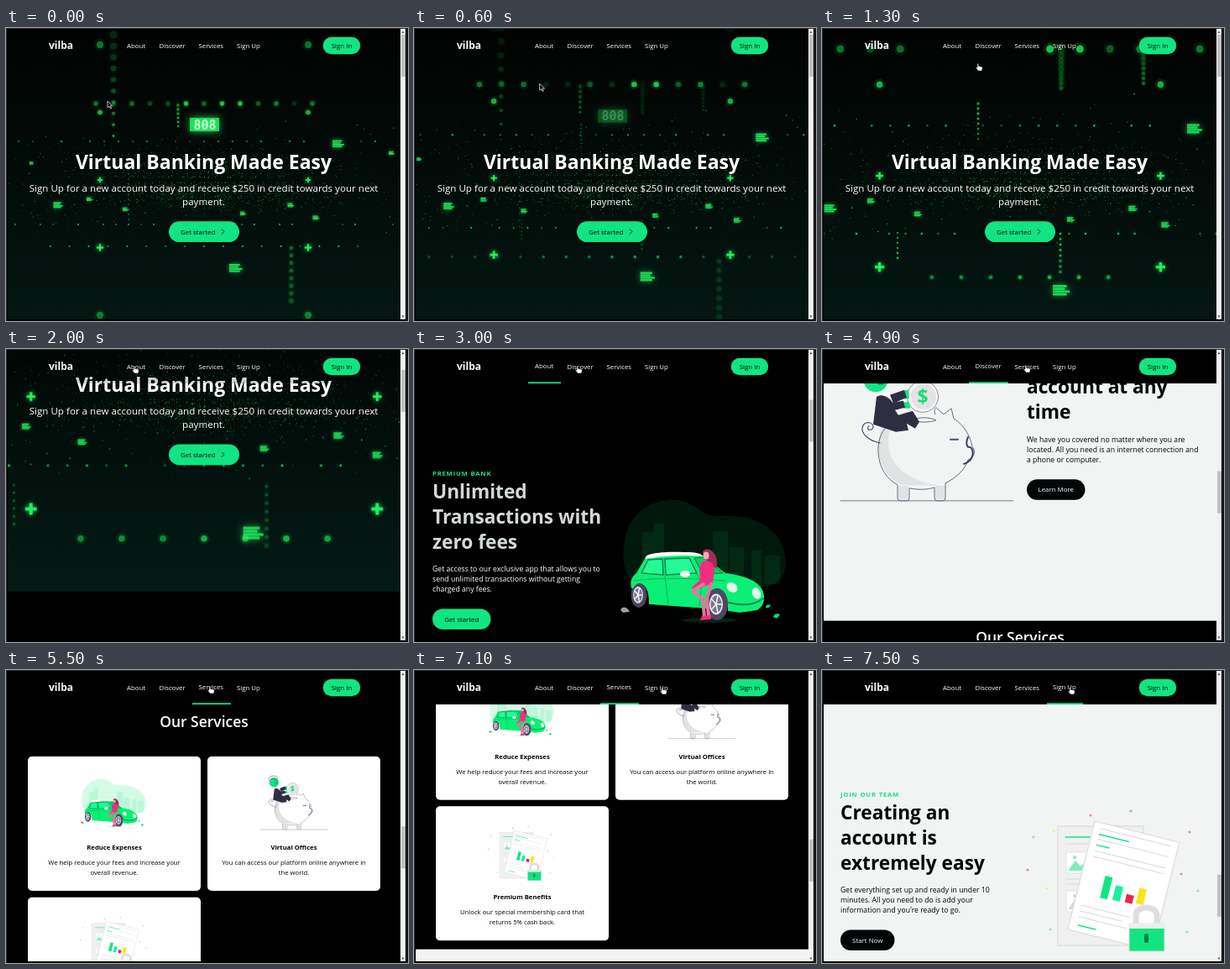
Write an HTML page with a canvas that moves like this. It is 479 by 349 pixels and loops after 8000 ms.

```html
<!DOCTYPE html>
<html lang="en">
<head>
<meta charset="utf-8">
<title>Banking landing page</title>
<style>
html, body { margin: 0; width: 100%; height: 100%; overflow: hidden; background: #000; }
#stage { position: relative; width: 479px; height: 349px; overflow: hidden; background: #000; }
#view { position: absolute; left: 2px; top: 1px; width: 468px; height: 346px; overflow: hidden; }
#page { position: absolute; left: -2px; top: -1px; width: 479px; height: 2311px; }
#page > *, #chrome { position: absolute; left: 0; top: 0; }
svg { display: block; }
text { font-family: "Open Sans", "Noto Sans", sans-serif; white-space: pre; }
</style>
</head>
<body>
<div id="stage">
  <div id="view"><div id="page">
    <canvas id="hero" width="479" height="406"></canvas>
    <svg id="content" width="479" height="2311"></svg>
  </div></div>
  <svg id="chrome" width="479" height="349"></svg>
</div>
<script>
const LOOP = 8000, STEP = 100;
const GREEN = '#10e582', INK = '#010606', LIGHT = '#f2f4f4', NAVY = '#2f2e41';
const $ = id => document.getElementById(id);
const clamp = (v, a = 0, b = 1) => Math.min(b, Math.max(a, v));

// ---- markup helpers ----
const text = (x, y, size, str, fill = '#fff', extra = '') =>
  `<text x="${x}" y="${y}" font-size="${size}" fill="${fill}" ${extra}>${str}</text>`;
const lines = (x, y, gap, size, list, fill, extra) =>
  list.map((s, i) => text(x, y + i * gap, size, s, fill, extra)).join('');
const rect = (x, y, w, h, fill, r = 0, extra = '') =>
  `<rect x="${x}" y="${y}" width="${w}" height="${h}" rx="${r}" fill="${fill}" ${extra}/>`;
const oval = (x, y, rx, ry, fill, extra = '') =>
  `<ellipse cx="${x}" cy="${y}" rx="${rx}" ry="${ry}" fill="${fill}" ${extra}/>`;
const path = (d, fill, extra = '') => `<path d="${d}" fill="${fill}" ${extra}/>`;
const line = (d, color, w = 1) =>
  `<path d="${d}" fill="none" stroke="${color}" stroke-width="${w}" stroke-linecap="round" stroke-linejoin="round"/>`;
const group = (transform, body) => `<g transform="${transform}">${body}</g>`;
const BOLD = 'font-weight="700"', MID = 'text-anchor="middle"';
const pill = (x, y, w, h, label, fill, ink) =>
  rect(x, y, w, h, fill, h / 2) + text(x + w / 2, y + h / 2 + 2.8, 7.9, label, ink, MID);

// ---- illustrations ----
function wheel(x, y, rx, ry) {
  let spokes = '';
  for (let i = 0; i < 5; i++) {
    const a = i * Math.PI * 2 / 5;
    spokes += `M${x - 1} ${y}l${rx * .5 * Math.cos(a)} ${ry * .54 * Math.sin(a)}`;
  }
  return oval(x, y, rx, ry, '#4a4860') + oval(x - 1, y, rx * .62, ry * .66, '#e6e6ea') +
    oval(x - 1, y, rx * .5, ry * .54, '#77758a') + line(spokes, '#f0f0f4', 1.6);
}

const car = haze =>
  path('M252 264C243 225 258 184 303 180C335 178 340 200 362 199C405 195 440 215 443 250C444 275 430 285 405 284L262 284Z', '#10e572', `opacity="${haze}"`) +
  `<g opacity="${haze * .7}">${[[272, 218, 14], [286, 208, 12], [356, 217, 18], [376, 236, 17], [402, 240, 12], [418, 246, 18]]
    .map(([x, y, w]) => rect(x, y, w, 280 - y, '#10e572')).join('')}</g>` +
  oval(352, 323, 32, 3, '#10e572', 'opacity=".16"') +
  wheel(268, 293, 9.5, 15) +
  path('M259 285C257 276 260 271 265 267L276 248C300 243 330 242 344 246L371 267C395 270 412 277 416 289C419 299 416 307 409 311L388 314L374 312C376 283 350 279 348 309L280 304C281 281 268 272 261 285Z', '#0bef76') +
  path('M271 267L279 251L296 250L297 269ZM300 269L299 250L328 249L337 267Z', '#20fb96', 'stroke="#0a7f48" stroke-width="1.4"') +
  path('M334 249L344 248L368 267L344 268Z', '#12c869', 'stroke="#0a7f48"') +
  path('M276 248C277 243 300 241 322 242C338 242 343 244 344 247C320 245 300 246 276 250Z', '#fff') +
  line('M262 276C290 272 330 273 371 276M299 270L303 304M337 268L343 279L340 307', '#08a957', .9) +
  line('M375 302C390 306 405 306 416 297', '#078b48', 2) +
  oval(323, 268, 6, 4, '#f1f1f1') + oval(379, 284, 7, 5.5, '#e4f7ec', 'transform="rotate(35 379 284)"') +
  oval(408, 291, 5, 7, '#e4f7ec', 'transform="rotate(-20 408 291)"') + wheel(361, 304, 13, 19) +
  path('M344 243C344 237 354 237 357 243C362 248 361 255 361 261L354 259Z', '#a52a5a') +
  oval(348, 246, 3.5, 4.5, '#f9aab9') +
  path('M343 254C350 250 357 254 358 262L356 279L345 283L334 288L331 284L341 275L340 262Z', '#f52b7d') +
  line('M345 280L332 288L344 298L346 319M354 280L349 297L351 319', '#ee6f9f', 4) +
  path('M343 318L354 317L354 322L341 323Z', '#f52b7d') +
  path('M246 311C248 306 254 307 257 313L249 314Z', '#9e9ea6') +
  path('M428 319C430 314 434 315 436 316C434 321 431 322 428 319ZM419 308C419 304 423 304 425 305C424 308 422 309 419 308Z', '#0bd969');

const piggy = () =>
  line('M22 335H228', '#6c6a7c', .9) +
  path('M78 237C58 262 66 302 93 316L145 317C120 316 82 302 79 270C78 256 82 246 88 237Z', '#e1e2e3') +
  line('M108 231C80 235 66 253 67 277C68 296 77 309 90 316V332Q90 335 94 335H101Q104 335 104 331V320C114 322 126 322 134 319V331Q134 335 138 335H144Q147 335 147 331V314C161 307 171 297 174 286C183 283 183 275 179 270C176 256 169 245 157 237L154 225L145 232L136 224C133 225 134 230 135 232', '#6c6a7c') +
  path('M91 317H103V333H91ZM135 317H146V333H135Z', '#e1e2e3') +
  line('M107 239C113 235 129 235 136 239C129 242 113 242 107 239Z', '#6c6a7c') +
  line('M153 262H162', '#504e70', 2) + line('M174 259C172 264 172 269 174 271C181 269 184 286 169 291', '#3f3d66', 2) +
  line('M69 266C57 264 47 256 48 248C50 239 61 241 61 247C60 253 51 250 56 246', '#504e70', 1.2) +
  oval(120, 211, 18.5, 18.5, '#f6f6f6', 'stroke="#8b8996"') + oval(121, 211, 15, 15, '#e2e3e4') +
  text(120, 219, 23, '$', '#18dc7b', `${BOLD} ${MID}`) +
  path('M96 204L103 203L104 213L98 214ZM96 218L104 217L105 225L98 225Z', GREEN) +
  path('M81 209L98 203L101 212L85 219Z', NAVY) +
  path('M65 211C72 207 80 211 84 218L97 216L99 224L87 227L91 233L108 228L116 241L111 249L101 243L103 251L88 253L61 244Z', NAVY) +
  path('M70 208L78 205L83 214Z', '#fff') +
  oval(64, 191, 14.5, 14.5, GREEN) +
  line('M48 183C46 171 61 169 71 173C77 176 76 181 70 181C61 177 53 179 51 186', NAVY, 1.2) +
  line('M65 184H68M73 184H75M71 187L74 192H71M67 196H73', NAVY, .9);

const confetti = [[320, 173, 0], [368, 168, 1], [438, 193, 0], [252, 199, 2], [276, 192, 3], [245, 238, 0],
  [268, 260, 3], [428, 243, 1], [448, 263, 2], [435, 312, 2], [272, 309, 2]];
const photo = (y, color) => rect(291, y, 32, 25, '#fff', 0, 'stroke="#e2e2e2"') +
  path(`M293 ${y + 22}L302 ${y + 10}L308 ${y + 17}L313 ${y + 12}L322 ${y + 22}Z`, color) + oval(301, y + 6, 2, 2, color);

const papers = () =>
  rect(281, 186, 102, 142, '#f0f0f0', 0, 'stroke="#e0e0e0" stroke-width="1.5"') +
  line('M290 199H320', GREEN, 1.4) + line('M290 207H322M290 249H318M290 255H310', '#d8d8d8') +
  photo(217, '#7df0b7') + photo(263, '#d6d6d6') +
  group('translate(325 180) rotate(14)',
    rect(0, 0, 104, 133, '#fff', 0, 'stroke="#dfdfdf" stroke-width="1.4"') +
    line('M9 14H45M9 27H24', GREEN, 1.4) +
    line('M9 7H95M9 20H95M9 34H95M9 41H95M9 101H68M9 108H60M9 115H67', '#d9d9d9') +
    line('M11 125H32', GREEN, 1.4) +
    rect(28, 60, 9, 27, GREEN) + rect(43, 68, 9, 18, '#16f29c') + rect(58, 75, 9, 10, '#ef2743') + rect(71, 64, 9, 19, '#f8e51e')) +
  line('M374 301V292C374 280 399 280 399 292V301', '#dedede', 7) +
  rect(366, 302, 42, 33, GREEN, 1, 'stroke="#dedede"') + rect(366, 302, 42, 6, '#eeeeee', 1) +
  rect(384, 314, 5, 11, '#087e4b', 2) +
  confetti.map(([x, y, c]) => oval(x, y, 1.6, 1.6, ['#f48aa2', '#b6a2da', '#8cebbd', '#f4eb9a'][c])).join('');

// ---- page ----
const TOPS = [365, 802, 1239, 1639];
const at = (i, body) => group(`translate(0 ${TOPS[i]})`, body);

function info(x, eyebrow, title, body, button, w, dark) {
  const ink = dark ? '#fff' : INK;
  return text(x, 150.8, 7.7, eyebrow, GREEN, `${BOLD} letter-spacing=".8"`) +
    lines(x, 177.5, 30, 22.7, title, dark ? '#d3d9da' : INK, BOLD) +
    lines(x, 265, 12.1, 8.7, body, ink) +
    pill(x, 309.5, w, 24.5, button, dark ? GREEN : INK, dark ? INK : '#fff');
}
const card = (x, y, title, body, art) => rect(x, y, 206, 160, '#fff', 5) + art +
  text(x + 103, y + 111, 7.7, title, INK, `${BOLD} ${MID}`) +
  lines(x + 103, y + 129, 12, 7.72, body, INK, MID);

$('content').innerHTML =
  text(235.5, 168, 23, 'Virtual Banking Made Easy', '#fff', `${BOLD} ${MID}`) +
  lines(235.5, 194.5, 16, 11.58, ['Sign Up for a new account today and receive $250 in credit towards your next', 'payment.'], '#fff', MID) +
  rect(194, 230.3, 84, 24.7, GREEN, 12.3) + text(208, 245.8, 7.9, 'Get started', INK) +
  line('M257.5 240L259.8 242.5L257.5 245', INK, .9) +
  rect(0, 406, 479, 437, '#000') + rect(0, 843, 479, 437, LIGHT) +
  rect(0, 1280, 479, 400, '#000') + rect(0, 1680, 479, 437, LIGHT) + rect(0, 2117, 479, 194, '#101522') +
  at(0, info(22, 'PREMIUM BANK', ['Unlimited', 'Transactions with', 'zero fees'],
    ['Get access to our exclusive app that allows you to', 'send unlimited transactions without getting', 'charged any fees.'], 'Get started', 69.5, true) + car(.11)) +
  at(1, info(244, 'UNLIMITED ACCESS', ['Login to your', 'account at any', 'time'],
    ['We have you covered no matter where you are', 'located. All you need is an internet connection and', 'a phone or computer.'], 'Learn More', 69.5) + piggy()) +
  at(2, text(236, 67.5, 17.5, 'Our Services', '#fff', `font-weight="600" ${MID}`) +
    card(26, 103, 'Reduce Expenses', ['We help reduce your fees and increase your', 'overall revenue.'], group('translate(-8.2 59) scale(.395)', car(.18))) +
    card(240, 103, 'Virtual Offices', ['You can access our platform online anywhere in', 'the world.'], group('translate(294.4 59.4) scale(.39)', piggy())) +
    card(26, 270.7, 'Premium Benefits', ['Unlock our special membership card that', 'returns 5% cash back.'], group('translate(-5.5 230.2) scale(.385)', papers()))) +
  at(3, info(22, 'JOIN OUR TEAM', ['Creating an', 'account is', 'extremely easy'],
    ['Get everything set up and ready in under 10', "minutes. All you need to do is add your", "information and you're ready to go."], 'Start Now', 64.5) + papers());

// ---- navigation, scrollbar, cursor ----
const LINKS = [['About', 144, 136, 175], ['Discover', 182.5, 175, 222], ['Services', 229.5, 222, 268], ['Sign Up', 275, 268, 311]];
$('chrome').innerHTML =
  rect(2, 1, 468, 40, '#000', 0, 'id="navBg"') +
  text(51, 25, 12, 'vilba', '#fff', BOLD) +
  LINKS.map(([name, x, a, b]) => `<g class="link">${text(x, 24, 7.8, name)}${rect(a, 39.3, b - a, 1.8, GREEN)}</g>`).join('') +
  pill(377.7, 10.8, 44.5, 20.4, 'Sign In', GREEN, INK) +
  rect(470, 1, 6, 346, '#f1f1f1') + path('M471.5 6L473 3.5L474.5 6ZM471.5 342.5L473 345L474.5 342.5Z', '#555') +
  rect(471, 8, 5, 50, '#c1c1c1', 0, 'id="thumb"') +
  path('M0 0H479V1H0ZM0 0H1V349H0ZM477 0H478V349H477Z', '#303030') +
  `<g id="arrow">${path('M0 0V8L2 6.3L3.4 9.2L4.7 8.6L3.4 5.8H6Z', '#111', 'stroke="#ddd" stroke-width=".8"')}</g>` +
  `<g id="hand">${path('M2 .8C2 -.1 3.6 -.1 3.6 .8V3.4L7.6 4.2Q8.4 4.4 8.3 5.4L7.6 9H3.2L.5 5.7C0 4.9 1 4.3 2 5.3Z', '#fff', 'stroke="#111" stroke-width=".6"')}</g>`;
const links = [...document.querySelectorAll('.link')];

const CURSOR = [[0, 121, 87], [1300, 183, 42], [1700, 150, 20], [2700, 150, 20], [3000, 192, 20], [3900, 192, 20],
  [4200, 229, 20], [4300, 229, 20], [4400, 240, 19], [6100, 240, 19], [6400, 277, 20], [6600, 277, 20], [6700, 293, 20], [LOOP, 293, 20]];
function cursorAt(t) {
  const i = CURSOR.findIndex(k => k[0] > t), [t0, x0, y0] = CURSOR[i - 1], [t1, x1, y1] = CURSOR[i];
  const p = (t - t0) / (t1 - t0);
  return [x0 + (x1 - x0) * p, y0 + (y1 - y0) * p];
}

const STARTS = [1800, 3200, 4690, 6916];
const ease = x => x < .5 ? 2 * x * x : 1 - 2 * (1 - x) ** 2;
const scrollAt = t => STARTS.reduce((s, t0, i) => s + (TOPS[i] - s) * ease(clamp((t - t0) / 500)), 0);

// ---- hero backdrop: a grid of lights flying towards the viewer ----
const g = $('hero').getContext('2d');
function seeded(seed) {
  return () => (seed = (seed * 16807) % 2147483647) / 2147483647;
}
const rnd = seeded(4211);
const specks = Array.from({ length: 1900 }, () => ({
  x: Math.round((rnd() + rnd() - 1) * 36) * 11, y: rnd() < .4 ? -8 - 14 * Math.floor(rnd() * 5) : 6 + 9 * Math.floor(rnd() * 7),
  z: .9 + 1.9 * rnd() ** .7, a: .12 + .8 * rnd() ** 2
}));
const hash = n => { const v = Math.sin(n * 12.99) * 43758.5; return v - Math.floor(v); };
const tint = a => `rgba(30,245,95,${a})`;
const grow = (ratio, t) => 1 / (1 - (1 - 1 / ratio) * t / 1.3);

function dot(x, y, r, a) {
  for (const [k, f] of [[1.8, .15], [1, .85]]) {
    g.fillStyle = tint(a * f);
    g.beginPath();
    g.arc(x, y, r * k, 0, 7);
    g.fill();
  }
}
function glow(blur, a, draw) {
  g.save();
  g.shadowColor = tint(.8);
  g.shadowBlur = blur;
  g.fillStyle = tint(a);
  draw();
  g.restore();
}
const plus = (x, y, r) => glow(5, .95, () => {
  g.fillRect(x - r, y - r * .28, r * 2, r * .56);
  g.fillRect(x - r * .28, y - r, r * .56, r * 2);
});
const flag = (x, y, w) => glow(w * .3, .8, () => {
  for (let i = 0; i < 4; i++) g.fillRect(x - w / 2, y - w * (.28 - i * .14), w * (.6 + .4 * hash(i + x * 0 + 3)), w * .12);
});
// x, top, bottom, gap, radius at top and bottom, time of full strength
const COLUMNS = [[128, 8, 130, 13.4, 4.5, 1.2, 0], [205, 92, 120, 5, 1.8, 1, 0], [340, 262, 330, 9, 2.2, 3, 0], [146, 150, 230, 6, .6, .6, 0],
  [285, 22, 76, 5.5, 4, 2.5, 1.3], [284, 245, 292, 6.5, 1.2, 1.8, 1.3], [186, 90, 136, 6, 1.6, .8, 1.3], [383, 30, 68, 6, 3, 2, 1.3], [90, 244, 274, 6, .9, 1.2, 1.3]];
const FLAGS = [[63, 211, 13], [100, 204, 8], [397, 138, 16], [283, 221, 8], [370, 226, 9], [275, 286, 18], [340, 211, 9], [460, 149, 8], [31, 161, 6], [143, 216, 8]];

function drawHero(t) {
  const cx = 236, cy = 181 - 3.8 * t;
  const bg = g.createLinearGradient(0, 0, 0, 406);
  bg.addColorStop(0, '#010302');
  bg.addColorStop(.45, '#020c09');
  bg.addColorStop(1, '#041b15');
  g.fillStyle = bg;
  g.fillRect(0, 0, 479, 406);

  for (const p of specks) {
    const z = p.z - .2 * t, size = clamp(1 / z, .8, 1.5);
    g.fillStyle = tint(p.a);
    g.fillRect(cx + p.x / z, cy + p.y / z, size, size);
  }

  const far = grow(1.3, t), mid = grow(1.35, t), low = grow(1.53, t), near = grow(1.66, t);
  for (let n = -16; n <= 16; n++) {
    const h = hash(n + 40), r = Math.abs(n);
    if (h > .35) {
      dot(cx + n * 17 * far, cy - 46 * far, .9 * far, h * .9);
      dot(cx + n * 15 * far, cy + 53 * far, .9 * far, h * .9);
    }
    const hidden = n > -4 && n < 1 ? clamp(1 - t) : 1;
    if (r < 7) dot(cx + n * 21.5 * near, cy - 91 * near, 2.7 * near, hidden * (r === 1 || n === 2 ? .9 : .15 + .4 * h));
    if (r < 9) dot(cx + n * 22.9 * low, cy + 79 * low, 1 + 2.5 * (low - 1), (.35 + .55 * h) * (r > 3 ? clamp(1 - t) : 1));
  }

  for (const [x, top, bottom, gap, r0, r1, peak] of COLUMNS) {
    const a = clamp(1 - Math.abs(t - peak) / 1.1), s = near / grow(1.66, peak);
    if (!a) continue;
    for (let y = top; y <= bottom; y += gap) {
      const p = (y - top) / (bottom - top), r = r0 + (r1 - r0) * p;
      dot(cx + (x - cx) * s, cy + (y - 181 + 3.8 * peak) * s, r * s, a * clamp(1.3 / r ** 1.4, .15, .85));
    }
  }

  for (const side of [-1, 1]) for (let k = -2; k <= 2; k++) {
    const x = cx + side * 124 * mid, y = cy + k * 80.5 * mid;
    if (k === 0 || k === 1) plus(x, y, (k ? 4.2 : 3.2) * mid);
    else dot(x, y, (k === -1 ? 2.8 : 4.2) * mid, k === -1 ? .8 : .5);
  }

  for (const [x, y, w] of FLAGS) flag(cx + (x - cx) * far, cy + (y - 181) * far, w * far);

  g.globalAlpha = clamp(1 - t / .8);
  const y = cy - 66 * far;
  glow(9, .85, () => {
    g.fillRect(cx - 17, y - 8, 35, 16);
    g.fillStyle = '#d8ffd8';
    g.font = 'bold 15px "DejaVu Sans Mono", monospace';
    g.textAlign = 'center';
    g.fillText('808', cx + 1, y + 5.5);
  });
  g.globalAlpha = 1;
}

// ---- playback ----
function render(t) {
  const s = scrollAt(t);
  if (s < TOPS[0]) drawHero(t / 1000);
  $('page').style.transform = `translateY(${-s}px)`;
  $('thumb').setAttribute('y', 8 + s / 6.95);
  $('navBg').setAttribute('opacity', clamp((t - 1900) / 600));
  const active = TOPS.filter(top => s >= top - .5).length - 1;
  links.forEach((link, i) => {
    link.firstChild.setAttribute('y', i === active ? 23 : 24);
    link.lastChild.setAttribute('opacity', i === active ? 1 : 0);
  });
  const [x, y] = cursorAt(t);
  for (const id of ['arrow', 'hand']) {
    $(id).setAttribute('transform', `translate(${x} ${y})`);
    $(id).setAttribute('opacity', (id === 'hand') === (t >= 1200) ? 1 : 0);
  }
}
const start = performance.now();
let shown = -1;
function tick() {
  const t = Math.floor((performance.now() - start) % LOOP / STEP) * STEP;
  if (t !== shown) render(shown = t);
  requestAnimationFrame(tick);
}
tick();
</script>
</body>
</html>
```
